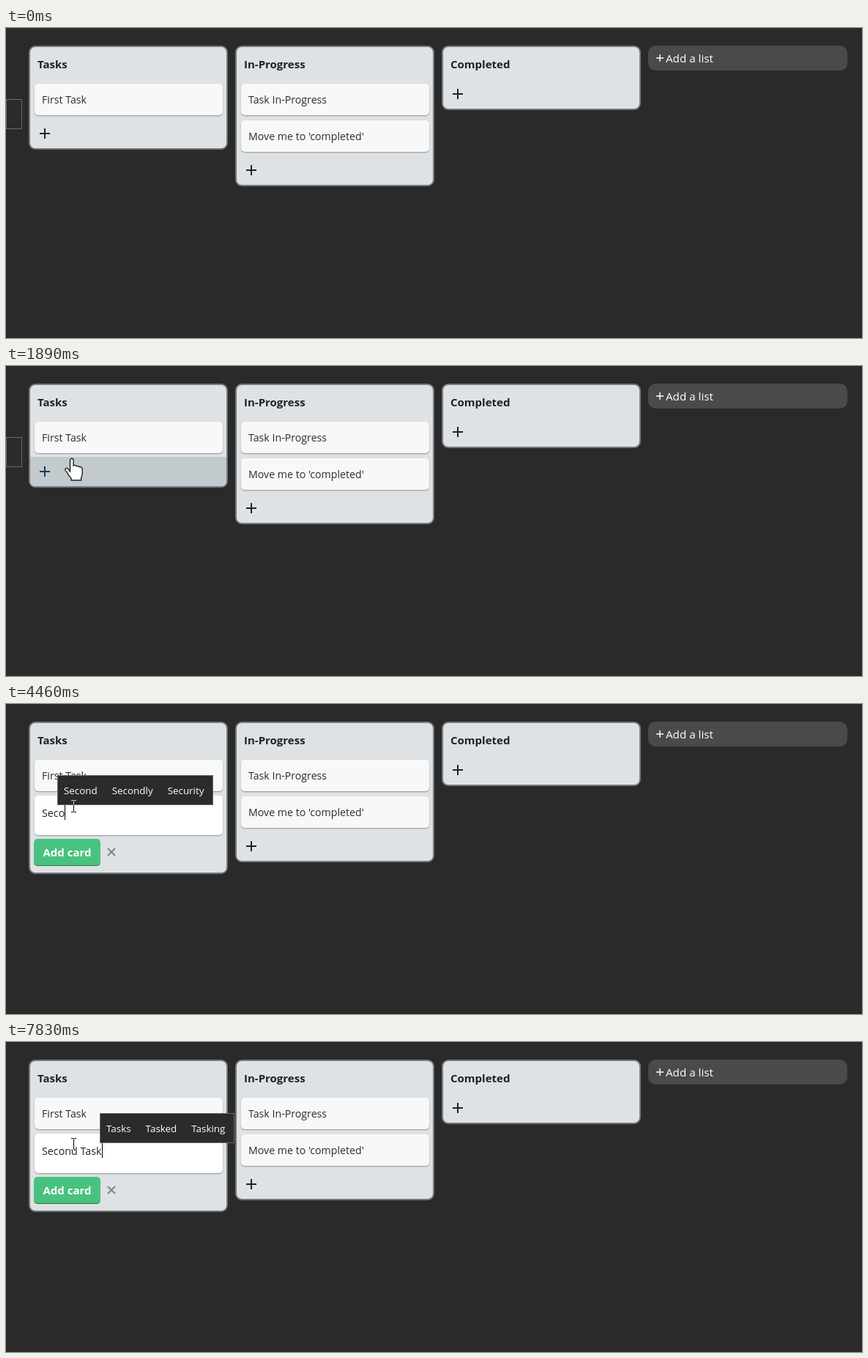
Recreate the animation shown at these times as an HTML page. Size 1169 by 423 pixels, loop 8000 ms.

```html
<!DOCTYPE html>
<html lang="en">
<head>
<meta charset="utf-8">
<title>Task board</title>
<style>
html, body { margin: 0; width: 100%; height: 100%; overflow: hidden; background: #2a2a2a; }
body { position: relative; font: 14.2px "Open Sans", "Noto Sans", sans-serif; color: #2b2b2b; }
div, svg { position: absolute; box-sizing: border-box; white-space: pre; }
svg { overflow: visible; }
[hidden] { display: none; }
.list { top: 24px; width: 272px; background: #dee2e5; border: 2px solid #73787c; border-radius: 9px; }
.title { left: 10px; top: 12px; font: bold 15px/22px "Open Sans", "Noto Sans", sans-serif; color: #1f2225; }
.card { left: 6px; width: 257px; height: 43px; padding-left: 10px; line-height: 43px;
  background: #f8f8f8; border-radius: 5px; box-shadow: 0 1px 1.5px #8d9296; }
.add { left: 0; bottom: 0; width: 268px; height: 40px; border-radius: 0 0 6px 6px; color: #222; }
.add.hover { background: #c2cace; color: #1c3a52; }
.add svg { left: 13px; top: 13px; }
.new { left: 877px; top: 24px; width: 272px; height: 34px; border-radius: 10px; background: #4a4a4a;
  padding-left: 24px; font: 500 15.2px/34px "Open Sans", "Noto Sans", sans-serif; color: #fff; }
.new svg { left: 11px; top: 12px; }
#editor { top: 99px; background: #fff; padding-top: 12px; line-height: 23px; font-size: 14.3px; }
#typed { color: #222; }
#hint { color: #757575; }
#caret { position: absolute; top: 13px; width: 1px; height: 20px; background: #000; }
#actions { left: 5px; }
.button { width: 91px; height: 37px; border-radius: 5px; background: #48c27f; border-bottom: 1px solid #36752f;
  color: #fff; text-align: center; font: bold 15px/37px "Open Sans", "Noto Sans", sans-serif; }
#popup { top: 97px; height: 41px; padding: 0 12px 0 8px; display: flex; gap: 20px; overflow: hidden;
  background: #2b2b2b; border: 1px solid #6b6b6b; color: #fff; font-size: 13.4px; line-height: 40px; }
#popup[hidden] { display: none; }
#beam { left: 89px; top: 131px; mix-blend-mode: difference; }
</style>
</head>
<body>
<script>
const LOOP = 8000;
const PHRASE = "Second Task";

const plus = (size, weight) => `<svg width="${size}" height="${size}" fill="none" stroke="currentColor"
  stroke-width="${weight}"><path d="M${size / 2} 0v${size}M0 ${size / 2}h${size}"/></svg>`;

const list = (x, height, title, cards) => `<div class="list" style="left:${x}px;height:${height}px">
  <div class="title">${title}</div>${cards.map((text, i) =>
    `<div class="card" style="top:${50 + i * 49.5}px">${text}</div>`).join("")}
  <div class="add">${plus(14, 2)}</div></div>`;

document.body.innerHTML =
  list(31, 142, "Tasks", ["First Task"]) +
  list(313, 192, "In-Progress", ["Task In-Progress", "Move me to 'completed'"]) +
  list(595, 88, "Completed", []) +
  `<div class="new">${plus(10, 1.4)}Add a list</div>
  <div id="popup"></div>
  <svg id="arrow" fill="#fff" stroke="#000"><path transform="scale(1.4)"
    d="M.5.5v16l3.7-3.5 2.4 5.5 2.2-1-2.3-5.4h5z"/></svg>
  <svg id="hand" fill="#fff" stroke="#000" stroke-width="1.2"><path d="M-2.5 18V2.5a2.3 2.3 0 0 1 4.6 0V10
    q2.2-1.4 4.2.8 2.4-1 4 1 3.6-.6 3.9 2.8v6.4q-.2 3-1.6 5.2v3.6H-1v-2.6q-3.6-3.6-5.2-7.2
    -1-2-2.6-3.4c-1.6-2.4 1.6-4.2 3.8-2.2z"/></svg>
  <svg id="beam" width="7" height="17" stroke="#fff" shape-rendering="crispEdges">
    <path d="M0 .5h3m1 0h3M3.5 1v15M0 16.5h3m1 0h3"/></svg>`;

const firstList = document.querySelector(".list");
const addRow = firstList.querySelector(".add");
firstList.insertAdjacentHTML("beforeend",
  `<div id="editor" class="card"><span id="typed"></span><span id="caret"></span><span
    id="hint">Add a description about a task or<br>bug!...</span></div>
  <div id="actions"><div class="button">Add card</div>
    <svg style="left:101px;top:13px" stroke="#7b8084" stroke-width="1.8"><path d="M0 0l10 10M10 0L0 10"/></svg></div>`);
const [editor, typed, caret, hint, actions, popup, arrow, hand, beam] =
  ["editor", "typed", "caret", "hint", "actions", "popup", "arrow", "hand", "beam"]
    .map(id => document.getElementById(id));

// Time at which each letter of the phrase appears
const keyTimes = [3540, 3870, 4270, 4460, 4930, 5320, 5720, 6120, 6390, 6510, 6720];

// Start time, left edge, suggestions, right edge while the box is still resizing
const popups = [
  [3670, 55, "Sorry Should Since"],
  [4130, 63, "See Send Seen"],
  [4360, 70, "Second Secondly Security"],
  [4730, 79, "Second Secondly Seconds", 283],
  [5120, 79, "Second Secondly Seconds"],
  [5250, 88, "Second Secondly Seconds", 294],
  [5520, 96, "Secondly Seconds Secondary"],
  [5720, 0, ""],
  [5920, 100, "half time and"],
  [6320, 108, "Thanks Today Those"],
  [6510, 114, "Table Tablet Tab"],
  [6650, 121, "Task Tasks Tasting"],
  [6850, 128, "Tasks Tasked Tasking", 295],
  [7040, 128, "Tasks Tasked Tasking"],
];

// Pointer path: time, x, y
const path = [[500, 2, 120], [1160, 73, 137], [1300, 83, 138], [1430, 88, 138]];

function pointerAt(t) {
  if (t >= 1890) return [90, 126];
  if (t >= 1760) return [89, 132];
  const step = 200 / 3;
  const time = Math.min(1430, 500 + Math.floor((t - 500 + 5) / step) * step);
  const i = Math.max(1, path.findIndex(p => p[0] >= time));
  const [t0, x0, y0] = path[i - 1], [t1, x1, y1] = path[i];
  const k = Math.max(0, (time - t0) / (t1 - t0));
  return [Math.round(x0 + (x1 - x0) * k), Math.round(y0 + (y1 - y0) * k)];
}

let shownPopup;
function showPopup(entry) {
  if (entry === shownPopup) return;
  shownPopup = entry;
  popup.hidden = !entry || !entry[2];
  if (popup.hidden) return;
  const [, left, words, right] = entry;
  popup.innerHTML = words.split(" ").map(word => `<span>${word}</span>`).join("");
  popup.style.left = left + "px";
  popup.style.width = right ? right - left + "px" : "auto";
}

function draw(t) {
  const editing = t >= 2280;
  const count = keyTimes.filter(time => time <= t).length;
  const editorHeight = count ? 54 : 76;

  const [x, y] = pointerAt(t);
  const moving = t >= 500 && !editing;
  const hovering = moving && x >= 33 && y >= 124;
  arrow.style.display = moving && !hovering ? "" : "none";
  hand.style.display = hovering ? "" : "none";
  beam.style.display = t >= 2680 ? "" : "none";
  for (const pointer of [arrow, hand]) {
    pointer.style.left = x + "px";
    pointer.style.top = y + "px";
  }

  addRow.hidden = editing;
  addRow.classList.toggle("hover", hovering);
  editor.hidden = actions.hidden = !editing;
  firstList.style.height = (editing ? editorHeight + 154 : 142) + "px";
  editor.style.height = editorHeight + "px";
  actions.style.top = editorHeight + 104 + "px";

  typed.textContent = PHRASE.slice(0, count);
  hint.hidden = count > 0;
  caret.hidden = !(t < 2420 || t >= 3080 && t < 3410 || t >= 3540 && t < 7430 || t >= 7830);
  showPopup(popups.findLast(entry => entry[0] <= t));
}

function frame() {
  draw(performance.now() % LOOP);
  requestAnimationFrame(frame);
}
frame();
</script>
</body>
</html>
```
